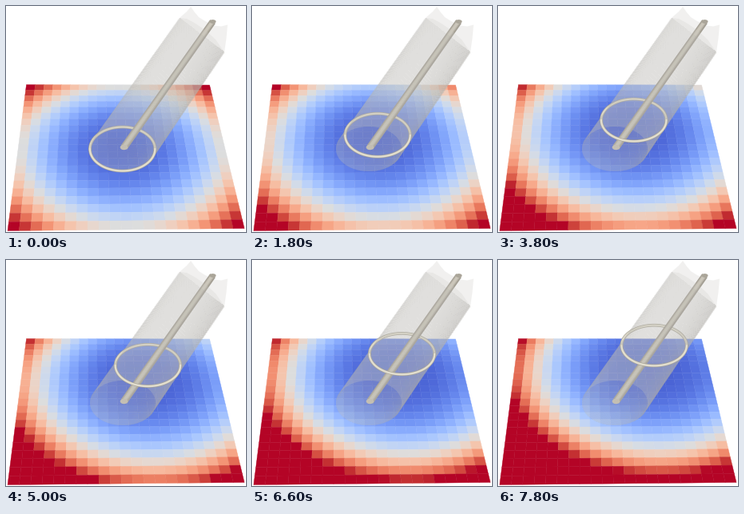
A matplotlib script that plays this animation: 300 by 283 pixels, repeating every 8000 ms.

```python
import numpy as np
import matplotlib.pyplot as plt
from matplotlib.animation import FuncAnimation
from matplotlib.collections import PolyCollection
from matplotlib.patches import Polygon

W, H, DPI = 300, 283, 100
FRAMES, STEP = 40, 200
PX = 72 / DPI
N = 21
CORNERS = [(25.5, 98.5), (254.5, 99), (298, 278.5), (2, 281.5)]
BASE = np.array([146, 179])
WALL = (0.80, 0.795, 0.775)

fig = plt.figure(figsize=(W / DPI, H / DPI), dpi=DPI, facecolor="white")
ax = fig.add_axes([0, 0, 1, 1])
ax.set_xlim(0, W)
ax.set_ylim(H, 0)
ax.axis("off")


def homography(dst):
    """Matrix taking the square [-1, 1]^2 to the four points."""
    rows, rhs = [], []
    for (u, v), (x, y) in zip([(-1, -1), (1, -1), (1, 1), (-1, 1)], dst):
        rows += [[u, v, 1, 0, 0, 0, -u * x, -v * x],
                 [0, 0, 0, u, v, 1, -u * y, -v * y]]
        rhs += [x, y]
    return np.append(np.linalg.solve(rows, rhs), 1).reshape(3, 3)


def ellipse(center, rx, ry, start, stop, n=60):
    a = np.radians(np.linspace(start, stop, n))
    return np.column_stack([center[0] + rx * np.cos(a),
                            center[1] + ry * np.sin(a)])


def shape(points, color, alpha, z):
    ax.add_patch(Polygon(points, fc=color, ec="none", alpha=alpha, zorder=z))


# Coloured plane
M = homography(CORNERS)
edges = np.linspace(-1, 1, N + 1)
gu, gv = np.meshgrid(edges, edges)
p = M @ np.stack([gu.ravel(), gv.ravel(), np.ones(gu.size)])
grid = (p[:2] / p[2]).T.reshape(N + 1, N + 1, 2)
quads = np.stack([grid[:-1, :-1], grid[:-1, 1:], grid[1:, 1:], grid[1:, :-1]],
                 axis=2).reshape(-1, 4, 2)
mid = (edges[:-1] + edges[1:]) / 2
cu, cv = (m.ravel() for m in np.meshgrid(mid, mid))
plane = PolyCollection(quads, edgecolors="face", linewidths=0.4 * PX, zorder=1)
ax.add_collection(plane)


def field(k):
    s = k / (FRAMES - 1)
    d2 = (cu - 0.377 * s) ** 2 + (cv + 0.497 * s) ** 2
    full, half = 1.72 + 0.27 * s, 0.92 + 0.3 * s
    low = 0.05
    power = np.log((1 - low) / (0.5 - low)) / np.log(full / half)
    return np.clip(low + (1 - low) * (d2 / full) ** power, 0, 1)


# Translucent tube: far wall, then near wall with its shading
SIDE = 25.5
top_left, top_right = np.array([217, 15]), np.array([273, 58])
far_top = [(275.5, 40), (277, 23.5), (269, 25.5), (260, 24.5), (249, 19),
           (241, 14), (236, 8), (231, 1), (226, 7), (219, 13)]
near_top = [(262, 42), (250, 31), (237, 22), (226, 16)]
upper = ellipse(BASE, 41, 28, 180 + SIDE, 360 + SIDE)
lower = ellipse(BASE, 41, 28, 180 + SIDE, SIDE)
shape(np.vstack([upper, [top_right], far_top, [top_left]]), WALL, 0.27, 2)
shape(np.vstack([lower, [top_right], near_top, [top_left]]), WALL, 0.24, 6)

frac = np.linspace(0, 1, len(lower))[:, None]
rim = top_left + (top_right - top_left) * frac
for i in range(len(lower) - 1):
    s = frac[i, 0]
    strip = [lower[i], lower[i + 1], rim[i + 1], rim[i]]
    ax.add_patch(Polygon(strip, fc=(0.66, 0.65, 0.63), ec="none", zorder=6,
                         alpha=0.04 + 0.16 * s ** 3 + 0.06 * (1 - s) ** 6,
                         antialiased=False))

# Rod along the axis
foot, tip = np.array([147.5, 177]), np.array([258.5, 19.5])
along = (tip - foot) / np.hypot(*(tip - foot))
side = np.array([-along[1], along[0]])


def rod_band(a, b, color):
    shape([foot + side * a * 4.6, foot + side * b * 4.6,
           tip + side * b * 4.1, tip + side * a * 4.1], color, 1, 4)


rod_band(-1, 1, "#a29d92")
rod_band(-0.75, 0.6, "#b9b4a8")
rod_band(-0.5, 0.3, "#cbc6ba")
shape(ellipse(foot, 4.8, 3.2, 0, 360), "#c6c0b2", 1, 4)
shape(ellipse(tip, 4, 2.4, 0, 360), "#aaa599", 1, 4)


# Sliding ring: the far half passes behind the rod, the near half in front
def ring_line(color, width, z):
    return ax.plot([], [], color=color, lw=width * PX, zorder=z,
                   solid_capstyle="butt")[0]


far_ring = [ring_line("#a8a496", 3.7, 3), ring_line("#dedacb", 2.3, 3)]
near_ring = [ring_line("#a8a496", 3.7, 7), ring_line("#e2decf", 2.4, 7)]


def update(k):
    plane.set_facecolor(plt.cm.coolwarm(field(k)))
    plane.set_edgecolor("face")
    center = 145.6 + 1.27 * k, 179 - 1.95 * k + 0.0027 * k * k
    ry = 27.5 - 0.055 * k
    for lines, start in ((far_ring, 178), (near_ring, -2)):
        arc = ellipse(center, 40.7, ry, start, start + 184)
        for line in lines:
            line.set_data(arc[:, 0], arc[:, 1])
    return [plane, *far_ring, *near_ring]


anim = FuncAnimation(fig, update, frames=FRAMES, interval=STEP,
                     init_func=lambda: update(0), repeat=True, repeat_delay=0)
plt.show()
```
